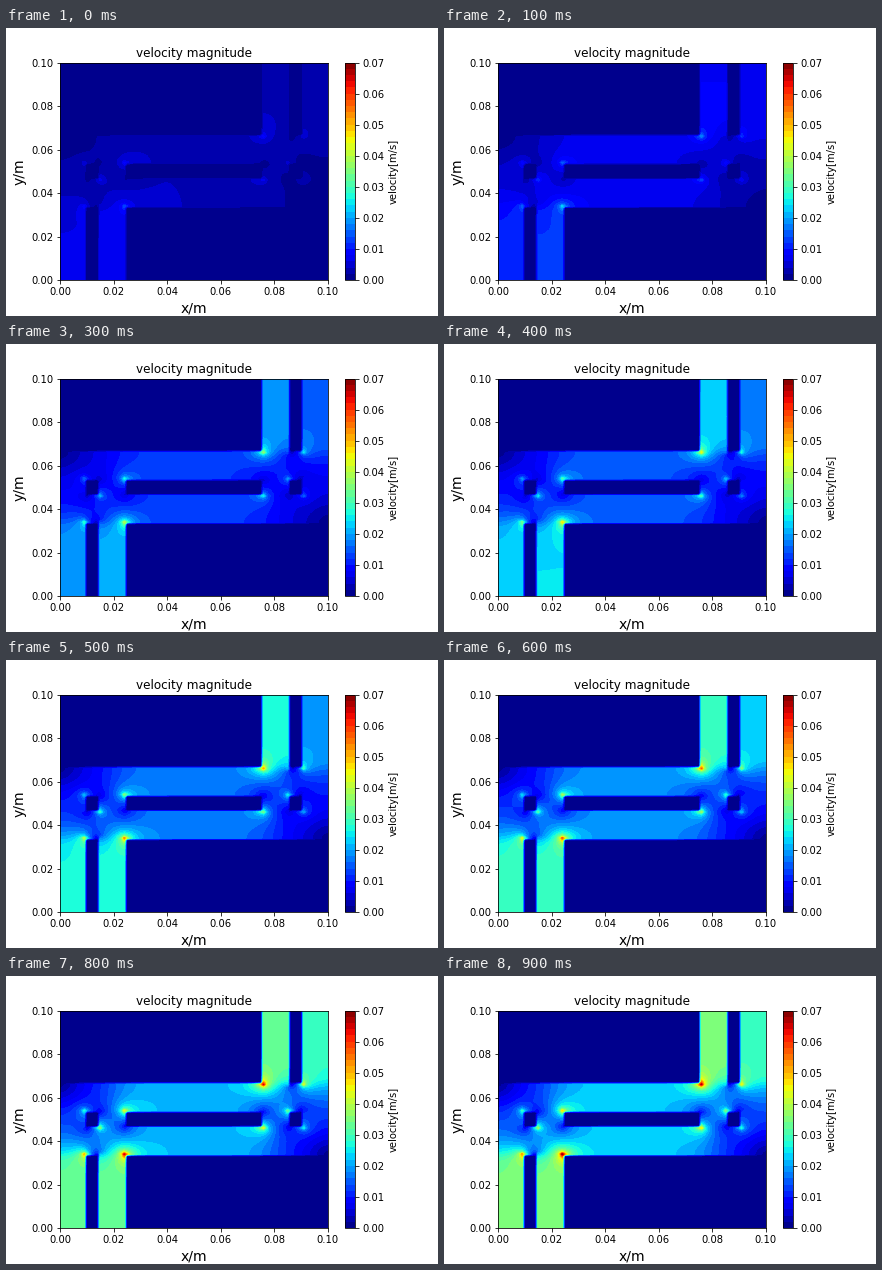
Write a matplotlib script that moves like this. It is 432 px wide and 288 px high and loops after 1000 ms.

```python
import numpy as np
import matplotlib.pyplot as plt
from matplotlib.animation import FuncAnimation

N = 101          # nodes per side, 1 mm apart
FRAMES = 10
LEVELS = np.linspace(0, 0.07, 36)

# Key frames: speeds at the two inlets and two outlets, extra channel depth
KEYS = [0, 1, 2, 3, 5, 7, 9]
IN_LEFT = [.0064, .0108, .0152, .0190, .0266, .0310, .0348]
IN_RIGHT = [.0075, .0125, .0172, .0210, .0274, .0315, .0352]
OUT_LEFT = [.0035, .0078, .0130, .0185, .0268, .0311, .0346]
OUT_RIGHT = [.0030, .0068, .0110, .0155, .0193, .0270, .0293]
DEPTH = [.05, .06, .09, .13, .13, .15, .14]


def make_fluid():
    fluid = np.ones((N, N), bool)
    for y0, y1, x0, x1 in [(67, N, 0, 76), (0, 34, 25, N), (47, 54, 25, 76),
                           (47, 54, 10, 15), (47, 54, 86, 91),
                           (0, 34, 10, 15), (67, N, 86, 91)]:
        fluid[y0:y1, x0:x1] = False
    return fluid


fluid = make_fluid()
open_x = fluid[:, 1:] & fluid[:, :-1]
open_y = fluid[1:] & fluid[:-1]


def gradient(phi):
    """Velocities on cell faces; closed faces stay at zero."""
    u, v = np.zeros((N, N + 1)), np.zeros((N + 1, N))
    u[:, 1:-1] = open_x * np.diff(phi, axis=1)
    v[1:-1] = open_y * np.diff(phi, axis=0)
    return u, v


def outflow(u, v):
    return np.diff(u, axis=1) + np.diff(v, axis=0)


def depth(row, gain):
    band = np.tanh((row - 33.5) / 2) - np.tanh((row - 66.5) / 2)
    return (1 + gain * band / 2)[:, None]


def solve(apply, rhs):
    """Conjugate gradients."""
    x, r = np.zeros_like(rhs), rhs.copy()
    p, rr = r.copy(), np.sum(r * r)
    goal = rr * 1e-12
    for _ in range(1500):
        if rr <= goal:
            break
        ap = apply(p)
        step = rr / np.sum(p * ap)
        x += step * p
        r -= step * ap
        rr, old = np.sum(r * r), rr
        p = r + rr / old * p
    return x


def velocity(frame):
    in_l, in_r, out_l, out_r, gain = (
        np.interp(frame, KEYS, k)
        for k in (IN_LEFT, IN_RIGHT, OUT_LEFT, OUT_RIGHT, DEPTH))
    ports = np.zeros((N + 1, N))
    ports[0, :10], ports[0, 15:25] = in_l, in_r
    ports[N, 76:86], ports[N, 91:] = out_l, out_r

    depth_x = depth(np.arange(N), gain)
    depth_y = depth(np.arange(N + 1) - 0.5, gain)

    def apply(phi):
        u, v = gradient(phi)
        return -outflow(depth_x * u, depth_y * v)

    # The surplus of inflow is stored evenly in the fluid
    source = np.diff(ports, axis=0)
    source -= fluid * source.sum() / fluid.sum()
    u, v = gradient(solve(apply, source))
    return u, v + ports


def speeds(frame):
    """Smooth and peak estimates of the speed at each node."""
    u, v = velocity(frame)
    mean = np.hypot((u[:, 1:] + u[:, :-1]) / 2, (v[1:] + v[:-1]) / 2)
    u, v = abs(u), abs(v)
    peak = np.hypot(np.maximum(u[:, 1:], u[:, :-1]),
                    np.maximum(v[1:], v[:-1]))
    return mean, peak


pairs = [speeds(i) for i in range(FRAMES)]
corner_mean, corner_peak = (s[34, 24] for s in pairs[-1])
sharp = np.clip((0.069 - corner_mean) / (corner_peak - corner_mean), 0, 1.5)
fields = [np.clip(m + sharp * (p - m), 0, 0.0699) for m, p in pairs]

plt.rcParams.update({"font.family": "DejaVu Sans", "font.size": 10,
                     "figure.subplot.bottom": 0.125})
fig, ax = plt.subplots(figsize=(6, 4), dpi=72)
axis = np.linspace(0, 0.1, N)


def contour(frame):
    return ax.contourf(axis, axis, fields[frame], LEVELS, cmap="jet")


shown = [contour(0)]
bar = fig.colorbar(shown[0], ax=ax, ticks=np.arange(8) / 100, format="%.2f")
bar.set_label("velocity[m/s]")
ax.set_title("velocity magnitude")
ax.set_xlabel("x/m", fontsize=14)
ax.set_ylabel("y/m", fontsize=14)


def update(frame):
    shown[0].remove()
    shown[0] = contour(frame)
    return shown


anim = FuncAnimation(fig, update, frames=FRAMES, init_func=lambda: [],
                     interval=100, repeat=True, repeat_delay=0, blit=False)
plt.show()
```
